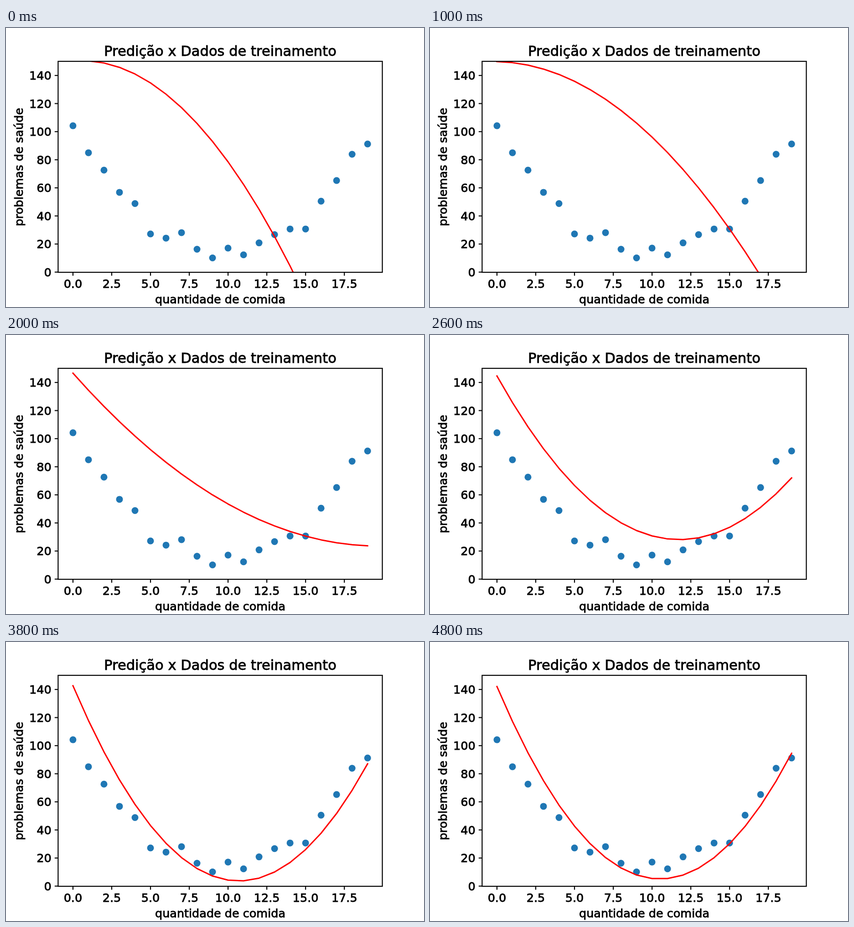
Animation of 917x611 px, one loop 4900 ms. Source, as an HTML page:

```html
<!DOCTYPE html>
<html lang="pt">
<head>
<meta charset="utf-8">
<style>
html, body { margin: 0; width: 100%; height: 100%; overflow: hidden; background: #fff; }
svg { display: block; }
text { font: 25.47px "DejaVu Sans", sans-serif; text-anchor: middle; stroke: #000; stroke-width: .9px; }
.title { font-size: 30.56px; }
.right { text-anchor: end; }
</style>
</head>
<body>
<svg id="chart" width="917" height="611" viewBox="0 0 917 611">
  <clipPath id="plot"><rect x="114" y="73" width="712" height="462"/></clipPath>
  <g id="dots" fill="#1f77b4"></g>
  <polyline id="curve" clip-path="url(#plot)" fill="none" stroke="#f00" stroke-width="3" stroke-linejoin="round" stroke-linecap="square"/>
  <g id="axes" stroke="#000" stroke-width="2.2" fill="none">
    <rect x="114.3" y="73" width="711.3" height="462"/>
  </g>
  <text class="title" x="470" y="60.6">Predição x Dados de treinamento</text>
  <text x="470" y="603.3">quantidade de comida</text>
  <text transform="translate(36.7 304.5) rotate(-90)">problemas de saúde</text>
</svg>
<script>
const $ = id => document.getElementById(id);
const px = x => 146.9 + 34.02 * x;
const py = y => 534.6 - 3.076 * y;

function add(parent, tag, attrs, text = '') {
  const el = document.createElementNS('http://www.w3.org/2000/svg', tag);
  for (const k in attrs) el.setAttribute(k, attrs[k]);
  el.textContent = text;
  parent.append(el);
}

const data = [104.2, 85, 72.6, 56.8, 48.8, 27.2, 24.2, 28.1, 16.3, 10.1,
  17.1, 12.3, 20.8, 26.7, 30.7, 30.7, 50.5, 65.2, 83.9, 91.2];
data.forEach((y, x) => add($('dots'), 'circle', { cx: px(x), cy: py(y), r: 7.5 }));

for (let y = 0; y < 150; y += 20) {
  add($('axes'), 'path', { d: `M114.3 ${py(y)}h-7.5` });
  add($('chart'), 'text', { class: 'right', x: 99.7, y: py(y) + 9.3 }, y);
}
for (let x = 0; x < 19; x += 2.5) {
  add($('axes'), 'path', { d: `M${px(x)} 535v7.5` });
  add($('chart'), 'text', { x: px(x), y: 568.5 }, x.toFixed(1));
}

// Key points of the training: step, slope, bend
const keys = [
  [0, .95, -.812], [10, -.234, -.514], [20, -12.475, .316], [26, -19.8, .841],
  [33, -25.09, 1.136], [38, -25.97, 1.213], [48, -26.08, 1.241]
];

function fitAt(step) {
  const i = Math.max(1, keys.findIndex(key => key[0] >= step));
  const from = keys[i - 1], to = keys[i];
  const k = (step - from[0]) / (to[0] - from[0]);
  const [, slope, bend] = from.map((v, j) => v + (to[j] - v) * k);
  const base = 150 + slope / 4 - .0006 * step ** 2;
  return x => base + slope * x + bend * x * x;
}

const start = performance.now();
function draw(now) {
  const fit = fitAt(Math.floor(Math.max(0, now - start) % 4900 / 100));
  $('curve').setAttribute('points', data.map((_, x) => [px(x), py(fit(x))]).join(' '));
  requestAnimationFrame(draw);
}
draw(start);
</script>
</body>
</html>
```
